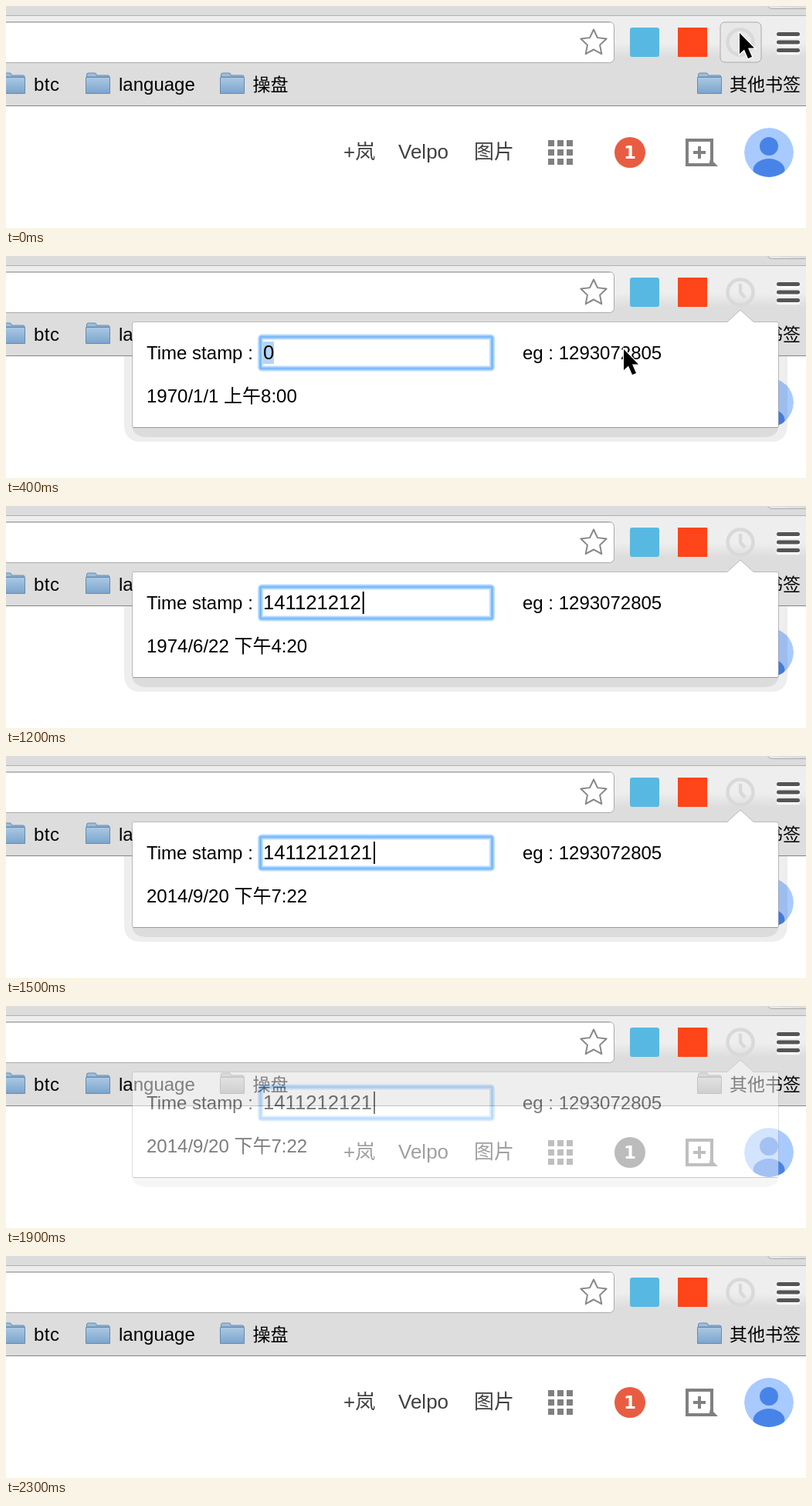
Recreate the animation shown at these times as an HTML page. Size 1036 px wide and 288 px high, loop 2400 ms.

```html
<!DOCTYPE html>
<html lang="zh">
<head>
<meta charset="utf-8">
<style>
html, body { margin: 0; width: 100%; height: 100%; overflow: hidden; background: #fff; }
svg { display: block; font: 24px "Liberation Sans", "Noto Sans CJK SC", "Noto Sans CJK", sans-serif; }
.cjk { font-size: 23px; }
.link { font-size: 26px; fill: #404040; }
.fading .tint { filter: grayscale(1); }
.fading #halo { display: none; }
</style>
</head>
<body>
<svg id="stage" width="1036" height="288" viewBox="0 0 1036 288">
  <defs>
    <linearGradient id="bar" gradientUnits="userSpaceOnUse" x1="0" y1="13" x2="0" y2="129">
      <stop offset=".3" stop-color="#eee"/><stop offset=".46" stop-color="#ddd"/>
    </linearGradient>
    <linearGradient id="blue" x2="0" y2="1">
      <stop stop-color="#abc8e3"/><stop offset="1" stop-color="#7ba5cd"/>
    </linearGradient>
    <clipPath id="round"><circle cx="988" cy="190" r="32"/></clipPath>
    <g id="folder" stroke="#668cb0">
      <path d="M1.5 92V89q0-2 2-2H12q2 0 2 2v1H29q2 0 2 2Z" fill="#9dbddb"/>
      <path d="M.5 92.500H31.500V113.500H.5Z" fill="url(#blue)"/>
    </g>
  </defs>

  <!-- toolbar -->
  <path d="M0 0H1036V13H0Z" fill="#dcdcdc"/>
  <path d="M0 13H1036V129H0Z" fill="url(#bar)"/>
  <path d="M0 12.500H1036" stroke="#b0b0b0"/>
  <path d="M0 129.500H1036" stroke="#858585"/>
  <path d="M986.500 0q1 3.500 6 3.500H1036" fill="#e8e8e8" stroke="#aaa"/>
  <rect x="-9" y="20.500" width="796.500" height="53" rx="6" fill="#fff" stroke="#aaa"/>
  <path d="M0 21.500H783" stroke="#ccc"/>
  <path id="star" fill="#fff" stroke="#888" stroke-width="2" stroke-linejoin="round"/>
  <rect id="hover" x="863" y="21" width="52" height="52" rx="6" fill="#f6f6f6" stroke="#aaa"/>
  <rect id="press" x="925" y="21" width="53" height="52" rx="6" fill="#e8e8e8" stroke="#aaa"/>
  <rect x="808" y="28" width="38" height="38" rx="3" fill="#57b9e2"/>
  <path d="M870 28h38v38h-38Z" fill="#ff4519"/>
  <g fill="none" stroke="#d9d9d9" stroke-width="4.500">
    <circle cx="951" cy="47" r="16.500"/><path d="M951 36V47L957 54"/>
  </g>
  <path d="M1000.500 39.500h25m-25 10.500h25m-25 10.500h25" stroke="#fff" stroke-width="5" stroke-linecap="round"/>
  <path d="M1000.500 36.500h25m-25 10.500h25m-25 10.500h25" stroke="#555" stroke-width="5" stroke-linecap="round"/>

  <!-- bookmarks -->
  <use href="#folder" x="-7"/>
  <use href="#folder" x="103"/>
  <use href="#folder" x="277" class="tint"/>
  <use href="#folder" x="895" class="tint"/>
  <text x="36" y="110" letter-spacing=".5">btc</text>
  <text x="146" y="110">language</text>
  <text x="319.500" y="110" class="cjk">操盘</text>
  <text x="937" y="110" class="cjk">其他书签</text>

  <!-- page header -->
  <g class="link">
    <text x="437" y="198">+岚</text>
    <text x="508" y="198">Velpo</text>
    <text x="606" y="198">图片</text>
  </g>
  <path d="M702 178h32m-32 12h32m-32 12h32" stroke="#808080" stroke-width="8" stroke-dasharray="8 4"/>
  <g class="tint">
    <circle cx="808" cy="190" r="20" fill="#e85d41"/>
    <text x="808" y="198" text-anchor="middle" fill="#fff" style="font:bold 23px 'DejaVu Sans',sans-serif">1</text>
  </g>
  <path d="M882 174H914V206H882ZM890 190h16m-8-8v16" fill="none" stroke="#808080" stroke-width="4"/>
  <path d="M912 198L922 208H910Z" fill="#808080"/>
  <g clip-path="url(#round)">
    <circle cx="988" cy="190" r="32" fill="#a8caff"/>
    <g fill="#4884e8"><circle cx="988" cy="182" r="12"/><ellipse cx="988" cy="213" rx="20.500" ry="15"/></g>
  </g>

  <g id="popup">
    <path id="halo" d="M153 130H1012V219q0 22-22 22H175q-22 0-22-22Z" fill-opacity=".067"/>
    <path d="M163 130H1001V218q0 17-20 17H183q-20 0-20-17Z" fill-opacity=".075"/>
    <path d="M166 85.500H934L951 70L968 85.500H998q2.500 0 2.500 2.500V220q0 2.500-2.500 2.500H166q-2.500 0-2.500-2.500V88q0-2.500 2.500-2.500Z" fill="#fff" stroke="#000" stroke-opacity=".22"/>
    <path d="M165 222.500H999" stroke="#999"/>
    <text x="182" y="134">Time stamp :</text>
    <text x="669" y="134">eg : 1293072805</text>
    <g fill="none">
      <rect x="329.500" y="105" width="300" height="41" rx="2" stroke="#b9dcff" stroke-width="7"/>
      <rect x="329.500" y="105" width="300" height="41" rx="1" stroke="#7dbafa" stroke-width="3"/>
    </g>
    <path id="mark" d="M333 111h14v29h-14Z" fill="#b4d5f8"/>
    <text id="entry" x="333" y="134" font-size="25.700"></text>
    <path id="caret" d="M0 111V140" stroke="#000" stroke-width="2"/>
    <text id="date" x="182" y="190"></text>
  </g>
  <path id="cursor" d="M0 0V27L6 21.500L11 33L16 31L11 19.500H19Z" stroke="#fff" stroke-width="2.500" paint-order="stroke"/>
</svg>
<script>
const $ = id => document.getElementById(id);
const show = (id, on) => $(id).style.display = on ? '' : 'none';
const stamp = '1411212121';

const points = [...Array(10)].map((_, i) => {
  const r = i % 2 ? 8.5 : 17.5, a = i * Math.PI / 5;
  return [761 + r * Math.sin(a), 48 - r * Math.cos(a)];
});
$('star').setAttribute('d', 'M' + points.join('L') + 'Z');

function dateText(seconds) {
  const d = new Date((seconds + 8 * 3600) * 1000), h = d.getUTCHours();
  const day = [d.getUTCFullYear(), d.getUTCMonth() + 1, d.getUTCDate()].join('/');
  const minute = String(d.getUTCMinutes()).padStart(2, '0');
  return `${day} ${h < 12 ? '上午' : '下午'}${h % 12 || 12}:${minute}`;
}

function draw(ms) {
  const t = Math.floor(ms % 2400 / 100) * 100;

  const alpha = t < 100 ? 0 : t < 1900 ? 1 : Math.max(0, (2100 - t) / 400);
  show('popup', alpha);
  $('popup').style.opacity = alpha;
  $('stage').classList.toggle('fading', alpha > 0 && alpha < 1);

  const count = Math.max(0, Math.min(10, Math.floor(4 + (t - 800) / 80)));
  const typed = stamp.slice(0, count) || '0';
  $('entry').textContent = typed;
  $('date').textContent = dateText(+typed);
  show('mark', !count);
  show('caret', count);
  $('caret').setAttribute('transform', `translate(${334 + 14.3 * count})`);

  const move = Math.min(t, 200) / 100;
  show('cursor', t < 500);
  $('cursor').setAttribute('transform', `translate(${950 - 75 * move} ${35 + 43 * move})`);
  show('press', t < 100);
  show('hover', t === 100);
}

const start = performance.now();
function tick() {
  draw(performance.now() - start);
  requestAnimationFrame(tick);
}
tick();
</script>
</body>
</html>
```
